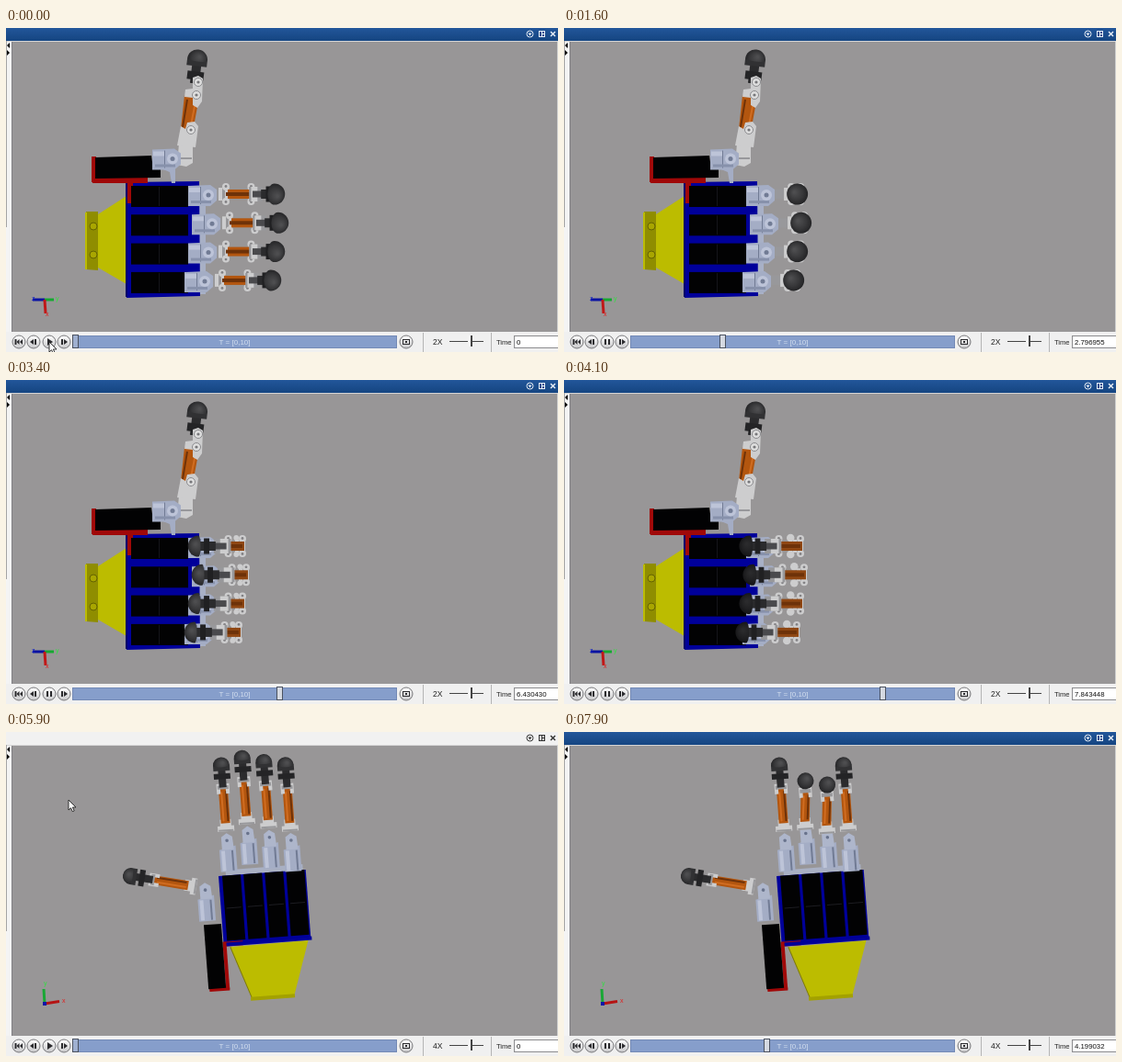
Recreate the animation shown at these times as an HTML page with a canvas. Size 600 by 353 pixels, loop 8000 ms.

```html
<!DOCTYPE html>
<html lang="en">
<head>
<meta charset="utf-8">
<title>Robot hand simulation</title>
<style>
html, body { margin: 0; width: 100%; height: 100%; overflow: hidden; background: #989697; }
canvas { display: block; }
</style>
</head>
<body>
<canvas id="stage" width="600" height="353"></canvas>
<script>
const g = document.getElementById('stage').getContext('2d');
const LOOP = 8000, CUT = 5600, CLICK = 6800;
const GREY = '#989697', BLACK = '#020203', BLUE = '#00009a', RED = '#a00808', ORANGE = '#b3560f';
const BROWN = '#6e3209', WHITE = '#cdcdce', SHADE = '#98989b', STEEL = '#a4adc5';
const STEEL_DARK = '#717b94', STEEL_LIGHT = '#bdc4d8', RUBBER = '#2b2b2d', INK = '#2b2b2e';

const clamp = (v, lo = 0, hi = 1) => Math.min(hi, Math.max(lo, v));
const mix = (a, b, u) => a + (b - a) * u;
const ease = u => (u = clamp(u), u * u * (3 - 2 * u));
const rad = deg => deg * Math.PI / 180;

function rect(c, x, y, w, h) { g.fillStyle = c; g.fillRect(x, y, w, h); }
// Bar between two x positions in either order, centred on y = 0.
function bar(c, a, b, half) { rect(c, Math.min(a, b), -half, Math.abs(b - a), 2 * half); }
function poly(c, ...p) {
  g.fillStyle = c;
  g.beginPath();
  for (let i = 0; i < p.length; i += 2) g.lineTo(p[i], p[i + 1]);
  g.closePath();
  g.fill();
}
function disc(c, x, y, r, edge) {
  g.fillStyle = c;
  g.beginPath();
  g.arc(x, y, r, 0, 7);
  g.fill();
  if (edge) { g.strokeStyle = edge; g.lineWidth = 1; g.stroke(); }
}
function line(c, w, ...p) {
  g.strokeStyle = c;
  g.lineWidth = w;
  g.beginPath();
  for (let i = 0; i < p.length; i += 2) g.lineTo(p[i], p[i + 1]);
  g.stroke();
}
function text(s, x, y, size, c, align = 'left') {
  g.font = size + 'px "Liberation Sans", Arial, sans-serif';
  g.fillStyle = c;
  g.textAlign = align;
  g.fillText(s, x, y);
}
function at(x, y, deg, draw) {
  g.save();
  g.translate(x, y);
  g.rotate(rad(deg));
  draw();
  g.restore();
}
function bolt(x, y) {
  disc('#dedede', x, y, 4.5, '#8b8b8e');
  disc('#77777a', x, y, 1.6);
}

// Hemisphere seen from an angle: a half circle, and its rim as a half ellipse of depth back.
function dome(r, back, dim = 1) {
  const shine = g.createRadialGradient(r * .2, -r * .3, 1, 0, 0, r * 1.2);
  [78, 56, 28].forEach((v, i) => {
    v = Math.round(v * dim);
    shine.addColorStop(i / 2, `rgb(${v},${v},${v + 2})`);
  });
  g.fillStyle = shine;
  g.beginPath();
  g.arc(0, 0, r, Math.PI, 0);
  g.ellipse(0, 0, r, back, 0, 0, Math.PI);
  g.fill();
}

// ---- side view: fingers point right and curl towards the camera ----
function sideHorn(x, y) {
  poly(STEEL, x - 15, y - 10, x + 9, y - 11, x + 16, y - 6, x + 16, y + 6, x + 9, y + 12, x - 15, y + 12);
  rect(STEEL_LIGHT, x - 14, y - 8, 12, 5);
  rect(STEEL_DARK, x - 2, y - 9, 1, 19);
  rect('#8791ab', x - 12, y + 6, 22, 3);
  disc(STEEL_LIGHT, x + 7, y, 6);
  disc(STEEL_DARK, x + 7, y, 2.5);
}
// Foreshortened chain: each link's length on screen is its length times the cosine of its turn.
function curlingFinger(dx, y, T) {
  const middle = rad(45 + 11.5 * T), end = rad(40 + 20 * T);
  const j1 = mix(241, 259, ease(T / 6)), j2 = j1 + 36 * Math.cos(middle);
  const along = d => j2 + d * Math.cos(end);
  const fold = Math.max(0, -Math.cos(middle));
  at(dx, y, 0, () => {
    sideHorn(213, 1);
    bar(SHADE, 229, j1 - 4, 5);
    bar(WHITE, j1 - 10, j1 - 6, 7);
    for (const s of [-1, 1]) {
      disc(WHITE, mix(j1, j2, .5), s * 9, 6 * fold);
      for (const x of [j1 - 2, j2]) {
        disc(WHITE, x, s * 8, 4);
        disc('#828184', x, s * 8.5, 1.4);
      }
    }
    bar(WHITE, j1 - 3, j1 + 1, 7);
    bar(fold ? '#8f4713' : ORANGE, j1, j2, 5);
    bar(BROWN, j1 - 2, j2, 2);
    bar(SHADE, along(-3), along(16), 8);
    bar(WHITE, along(0), along(9), 8);
    bar('#4a4a4d', along(2), along(18), 3.5);
    bar(RUBBER, along(14), along(33), 5);
    bar('#202022', along(21), along(27), 8.5);
    const side = Math.cos(end) < 0 ? -90 : 90;
    at(along(33), 0, side, () => dome(11.5, 11.5 * Math.abs(Math.sin(end)), Math.sin(end) < 0 ? .55 : 1));
  });
}
function sideThumb() {
  poly(STEEL, 166, 152, 184, 150, 184, 169, 180, 169, 178, 157);
  poly(WHITE, 188, 126, 203, 126, 203, 147, 196, 151, 186, 149);
  rect(SHADE, 190, 141, 12, 2);
  poly(ORANGE, 194, 73, 210, 75, 203, 113, 190, 110);
  line(BROWN, 2, 197, 78, 192, 108);
  line('#d06c20', 2, 206, 80, 201, 106);
  poly(WHITE, 190, 107, 195, 110, 197, 103, 205, 102, 209, 107, 206, 130, 186, 128);
  bolt(201, 111);
  at(208, 34.5, 6.9, () => {
    rect(RUBBER, -5, 6, 10, 20);
    rect('#242426', -9, 13, 18, 9);
    rect('#313133', -11, 0, 22, 7);
    dome(11, 2);
  });
  poly(WHITE, 195, 67, 203, 66, 203, 54, 209, 52, 214, 55, 213, 80, 208, 87, 203, 84, 203, 76, 194, 75);
  bolt(209, 59);
  bolt(207, 73);
  sideHorn(174, 142.5);
}
function sideView(T) {
  poly('#bcbc00', 100, 203, 131, 183, 131, 279, 100, 261);
  poly('#8f8d00', 87, 200, 100, 200, 100, 264, 87, 263);
  rect('#bcbc00', 86, 201, 2, 62);
  for (const y of [216, 247]) disc('#a9a600', 95, y, 4, '#656300');
  rect('#a8b0c6', 209, 172, 8, 118);
  poly(BLUE, 130, 168, 210, 167, 211, 292, 131, 294);
  rect('#00006a', 130, 168, 2, 125);
  rect(RED, 93, 140, 5, 28);
  rect(RED, 94, 163, 60, 6);
  rect(RED, 132, 168, 6, 23);
  poly(BLACK, 97, 141, 158, 139, 160, 154, 168, 154, 168, 163, 97, 164);
  for (let i = 0; i < 4; i++) {
    const y = 172 + i * 31.3;
    rect(BLACK, 136, y, 62, 23);
    rect('#15151a', 166, y + 1, 1, 21);
  }
  sideThumb();
  for (let i = 0; i < 4; i++) curlingFinger(4 * Math.sin(i * 1.57) - 1.3 * Math.max(0, i - 2) * 0, 181 + i * 31.3, T);
  line('#0a12a0', 3, 29, 296, 42, 296);
  line('#16a832', 3, 42, 296, 52, 296);
  line('#c01818', 3, 42, 296, 43, 311);
  text('z', 28, 297, 7, '#1020c8');
  text('y', 54, 297, 7, '#30e040');
  text('x', 43, 314, 7, '#e02020');
}

// ---- front view: fingers point up ----
function horn(x, y) {
  at(x, y, 0, () => {
    poly(STEEL, -9, 10, 9, 6, 9, 34, -9, 34);
    rect(STEEL_LIGHT, -7, 11, 4, 22);
    rect(STEEL_DARK, 4, 11, 2, 22);
    poly('#aeb6cb', -6, -4, 0, -8, 6, -4, 7, 10, -6, 10);
    disc('#69738c', 0, 0, 1.8);
  });
}
function digit(x, y, deg, curl) {
  at(x, y, deg, () => {
    const top = 35 + 12 * curl, end = 73 + 6 * curl, lean = 3 * curl, open = 1 - curl;
    rect(WHITE, -6, end - 4, 12, 12);
    rect(WHITE, -9, end + 3, 18, 6);
    rect(SHADE, -8, end + 7, 16, 2);
    poly(ORANGE, -5 + lean, top, 5 + lean, top, 5, end, -5, end);
    line('#d06c20', 2, -2 + lean, top + 4, -2, end - 2);
    line(BROWN, 2, 3 + lean, top + 3, 3, end - 2);
    for (const s of [-7, 3]) rect(WHITE, s + lean, top - 5, 4, 11);
    rect(SHADE, -6 + lean, top - 3, 12, 4);
    g.translate(4 * curl, 10 + 25 * curl);
    rect(RUBBER, -4, 3, 8, 21 * open);
    rect('#242426', -9, 9, 18, 6 * open);
    rect('#313133', -9, 0, 18, 6 * open);
    dome(9, mix(2, 9, curl));
  });
}
function frontView(T) {
  const curl = Math.pow(T / 4.2, 1.4);
  at(231, 157, -4.3, () => {
    rect('#a9b0c3', 8, -6, 84, 8);
    rect(BLUE, 0, 0, 95, 74);
    poly('#bcbc00', 7, 78, 92, 77, 72, 137, 27, 137);
    line('#7f7b00', 1, 7, 78, 27, 137);
    rect('#a3a100', 25, 134, 48, 4);
    rect(RED, 0, 72, 21, 5);
    rect(RED, -1, 72, 4, 52);
    rect(RED, -19, 121, 22, 4);
    rect(BLUE, 3, 73, 93, 4);
    rect(BLACK, -20, 52, 19, 70);
    digit(-104.6, -9.4, -76.4, 0);
    horn(-15.5, 14);
    [-130, -136, -130, -125].forEach((y, i) => {
      const x = 12 + 23.2 * i;
      rect(BLACK, x - 8, 0, 20, 71);
      rect('#1d1d22', x - 6, 35, 16, 1);
      horn(x, y + 92);
      digit(x, y, 0, i % 3 ? curl : 0);
    });
  });
  line('#19a835', 3, 42, 296, 41, 280);
  line('#b51414', 3, 42, 296, 58, 293.5);
  rect('#1018a8', 40, 294, 4, 4);
  text('y', 41, 276, 7, '#30e040');
  text('x', 61, 295, 7, '#e02020');
}

// ---- window and controls ----
function frame(active) {
  const blue = g.createLinearGradient(0, 0, 0, 14);
  blue.addColorStop(0, '#22569a');
  blue.addColorStop(1, '#154581');
  rect(active ? blue : '#f1f1f1', 0, 0, 600, 14);
  rect('#d5d5d5', 0, 14, 600, 1);
  rect('#f4f4f4', 0, 15, 6, 317);
  rect('#a5a5a5', 0, 14, 1, 203);
  rect('#808083', 6, 15, 1, 316);
  rect('#d0d0d0', 599, 15, 1, 316);
  poly('#000', 4, 16, 4, 22, 1, 19);
  poly('#000', 1, 24, 1, 30, 4, 27);
  const c = active ? '#e8eef6' : '#333';
  g.strokeStyle = c;
  g.lineWidth = 1;
  g.beginPath();
  g.arc(569.5, 6.5, 3.5, 0, 7);
  g.stroke();
  poly(c, 567.5, 5.5, 571.5, 5.5, 569.5, 8.5);
  g.strokeRect(579.5, 3.5, 6, 6);
  line(c, 1, 582.5, 3, 582.5, 10);
  line(c, 1, 582, 6.5, 586, 6.5);
  line(c, 1.4, 592, 4, 597, 9);
  line(c, 1.4, 597, 4, 592, 9);
}
function button(x) {
  const shade = g.createLinearGradient(0, 335, 0, 349);
  shade.addColorStop(0, '#fff');
  shade.addColorStop(1, '#c9c9cb');
  disc(shade, x, 342, 7, '#77777a');
}
function post(x) { rect(INK, x, 339, 2, 6); }
function arrow(x, w, half = 3) { poly(INK, x, 342 - half, x, 342 + half, x + w, 342); }
function toolbar(T, speed) {
  rect('#f0f0f0', 0, 331, 600, 22);
  [14, 30, 47, 63, 435].forEach(button);
  post(9.5);
  arrow(14.5, -3);
  arrow(18, -3);
  arrow(30, -4);
  post(31);
  if (T > 0 && T < 10) { post(44); post(48); } else arrow(45, 6, 4);
  post(60);
  arrow(63, 4);
  g.strokeStyle = INK;
  g.lineWidth = 1;
  g.strokeRect(431.5, 339.5, 7, 5);
  rect(INK, 434, 341, 2, 2);

  rect('#7389b5', 72, 335, 353, 14);
  rect('#869ecb', 73, 336, 351, 12);
  text('T = [0,10]', 248.5, 345, 8, '#d3deef', 'center');
  const x = Math.round(72 + T * 34.56);
  rect('#4b5260', x, 334, 7, 15);
  rect(T ? '#d5d9e1' : '#9fb0d0', x + 1, 335, 5, 13);

  for (const s of [453, 527]) rect('#b5b5b5', s, 332, 1, 21);
  text(speed, 464, 345, 8.5, '#222');
  rect('#444', 482, 341, 37, 1);
  rect('#f4f4f4', 502, 335, 3, 12);
  rect('#444', 505, 335, 2, 12);
  text('Time', 533, 345, 7.6, '#222');
  rect('#8b8b8e', 552, 335, 48, 14);
  rect('#fff', 553, 336, 47, 12);
  text(T % 10 ? T.toFixed(6) : String(T), 555, 345, 7.8, '#111');
}
function cursor(x, y) {
  const p = [0, 0, 0, 11, 2.5, 8.7, 4.3, 12.6, 6.2, 11.8, 4.4, 8, 8, 8];
  at(x, y, 0, () => {
    poly('#fff', ...p);
    line('#222', .9, ...p, 0, 0);
  });
}
// The pointer leaves upwards after each press of the play button.
function pointer(ms, side) {
  const away = Math.max(0, (ms - (side ? 200 : 6900)) / 500);
  const come = side ? 1 : ease((ms - 5900) / 800);
  cursor(mix(68, 47, come) + 38 * away, mix(74, 342, come) - 308 * away);
}

function draw(ms) {
  const side = ms < CUT;
  const T = side
    ? clamp(mix(.980217, 9.458326, (ms - 700) / 4200), 0, 10)
    : clamp((ms - 6850) / 1050) * 4.199032;
  rect(GREY, 0, 0, 600, 353);
  if (side) sideView(T); else frontView(T);
  frame(side || ms >= CLICK);
  toolbar(T, side ? '2X' : '4X');
  pointer(ms, side);
}
function tick(now) {
  draw(Math.floor(now % LOOP / 100) * 100);
  requestAnimationFrame(tick);
}
draw(0);
requestAnimationFrame(tick);
</script>
</body>
</html>
```
